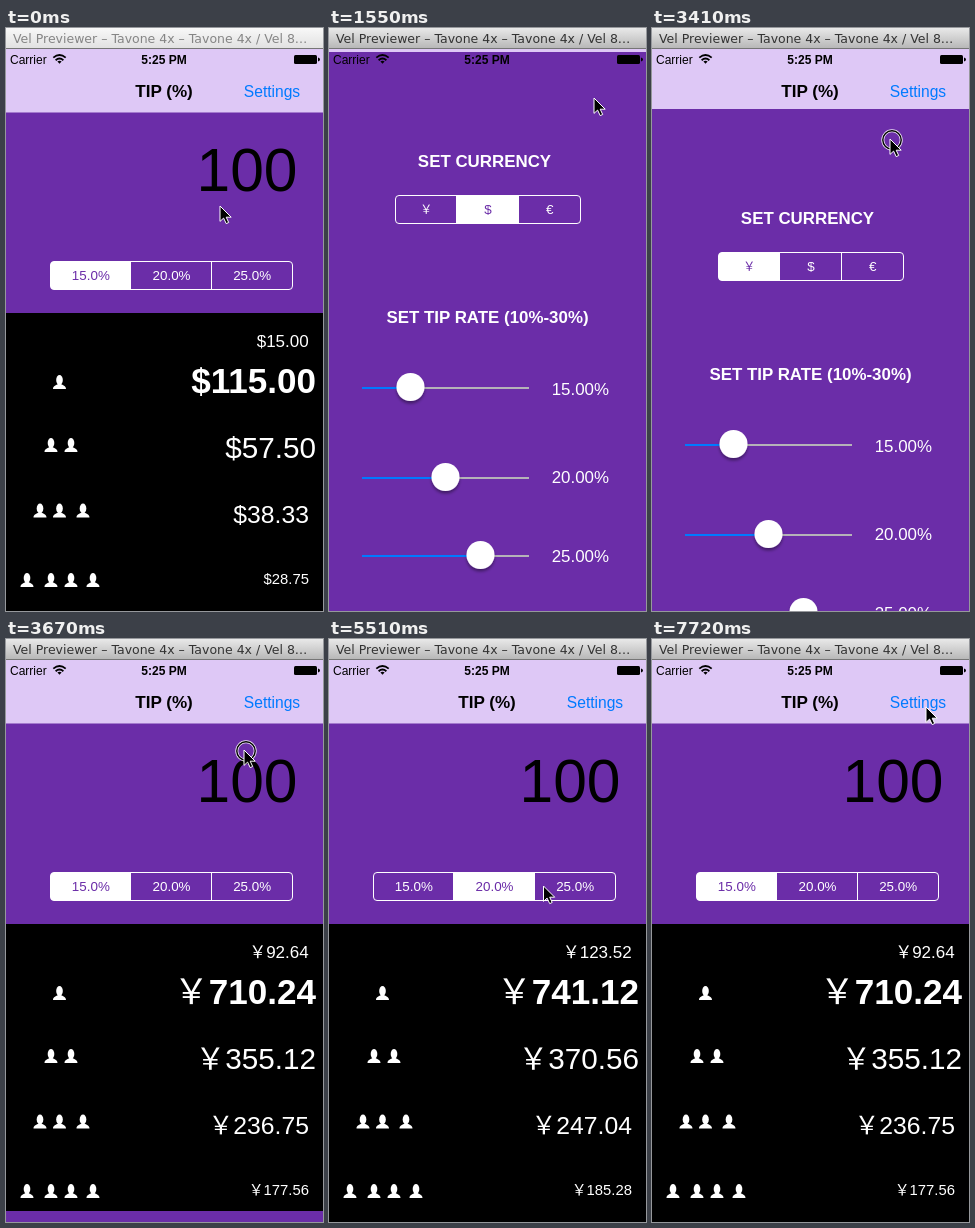
An HTML page that plays this animation: 317x583 px, repeating every 7990 ms.

```html
<!DOCTYPE html>
<html lang="en">
<head>
<meta charset="utf-8">
<title>Tip calculator</title>
<style>
  html, body { margin: 0; width: 100%; height: 100%; overflow: hidden; background: #000; }
  svg { display: block; width: 317px; height: 583px; }
  text { font-family: "Liberation Sans", Arial, sans-serif; font-size: 16.9px; }
  .bold { font-weight: 700; }
  .end { text-anchor: end; }
  .mid { text-anchor: middle; }
  .white { fill: #fff; }
  .small { font-size: 12px; }
  .yen { font-family: "Noto Sans CJK JP", "Noto Sans CJK SC", sans-serif; font-weight: 400; }
  .purple { fill: #6b2da8; }
  .seg text { font-size: 13.4px; text-anchor: middle; }
  .seg .yen { font-size: 12px; }
  .window { font: 12.5px "DejaVu Sans", sans-serif; }
</style>
</head>
<body>
<svg viewBox="0 0 317 583">
  <defs>
    <linearGradient id="active" x2="0" y2="1">
      <stop stop-color="#e9e9e9"/><stop offset="1" stop-color="#b5b5b5"/>
    </linearGradient>
    <linearGradient id="inactive" x2="0" y2="1">
      <stop stop-color="#f8f8f8"/><stop offset="1" stop-color="#e0e0e0"/>
    </linearGradient>
    <filter id="shadow" x="-50%" y="-50%" width="200%" height="200%">
      <feDropShadow dx="0" dy="2.5" stdDeviation="1.8" flood-opacity=".4"/>
    </filter>
    <g id="person" class="white">
      <ellipse cy="-2" rx="3.3" ry="5"/>
      <path d="M-6.5 7C-6.5 3.4-3 3.4-1.6 2H1.6C3 3.4 6.5 3.4 6.5 7Z"/>
    </g>
  </defs>

  <g id="main">
    <rect width="317" height="583"/>
    <rect class="purple" y="84" width="317" height="201"/>
    <rect y="21" width="317" height="63.5" fill="#dec8f6"/>
    <text class="bold mid" x="158" y="69" style="font-size:17.1px">TIP (%)</text>
    <text id="settings" class="mid" x="266" y="69" style="font-size:15.6px">Settings</text>
    <text class="end" x="291.5" y="163" style="font-size:60.5px">100</text>
  </g>

  <g id="page">
    <rect class="purple" y="21" width="317" height="562"/>
    <text class="bold mid white" x="155.5" y="136">SET CURRENCY</text>
    <text class="bold mid white" x="158.5" y="292">SET TIP RATE (10%-30%)</text>
  </g>

  <g id="status">
    <text class="small" x="4" y="35.5">Carrier</text>
    <g fill="none" stroke="#000" stroke-width="1.8">
      <path d="M47.3 29.6Q53.5 24.4 59.7 29.6M49.6 32.2Q53.5 28.8 57.4 32.2"/>
      <path d="M53.5 35.8L51.4 33.6Q53.5 31.8 55.6 33.6Z" fill="#000" stroke="none"/>
    </g>
    <text class="small bold mid" x="158" y="35.5">5:25 PM</text>
    <rect x="288" y="27" width="23" height="9" rx="1.5"/>
    <path d="M312 29.5q2 .4 2 2t-2 2z"/>
  </g>

  <rect id="bar" width="317" height="21"/>
  <path d="M0 20.5H317" stroke="#757575"/>
  <text id="caption" class="window" x="7" y="15">Vel Previewer – Tavone 4x – Tavone 4x / Vel 8…</text>

  <g id="cursor">
    <g id="ring" fill="none">
      <circle cx="2" cy="1" r="9.2" stroke="#fff" stroke-opacity=".9" stroke-width="3"/>
      <circle cx="2" cy="1" r="9.2" stroke="#000" stroke-width="1.4"/>
    </g>
    <path d="M0 0V15.4L3.6 12.1 6.2 17.6 8.7 16.5 6.2 11.2H11.2Z" stroke="#fff"/>
  </g>
</svg>
<script>
const LOOP = 7990, TICK = 88.05, FIRST = 500;
const PURPLE = '#6b2da8', HEIGHT = 562;
const $ = id => document.getElementById(id);

function add(parent, tag, attrs, text = '') {
  const el = document.createElementNS('http://www.w3.org/2000/svg', tag);
  for (const key in attrs) el.setAttribute(key, attrs[key]);
  el.textContent = text;
  parent.append(el);
  return el;
}

// Segmented control; returns a function that selects one cell.
function segments(parent, x, y, width, labels) {
  const g = add(parent, 'g', { class: 'seg' });
  const count = labels.length, h = 28;
  const edge = i => x + Math.floor(i * width / count);
  add(g, 'rect', { x, y, width, height: h, rx: 3.5, fill: 'none', stroke: '#fff' });
  const fill = add(g, 'path', { fill: '#fff' });
  const texts = labels.map((label, i) => {
    if (i) add(g, 'path', { d: `M${edge(i)} ${y}v${h}`, stroke: '#fff' });
    const cls = label === '￥' ? 'yen' : '';
    return add(g, 'text', { x: x + (i + .5) * width / count, y: y + 18.7, class: cls }, label);
  });
  return index => {
    const a = index === 0 ? 3.5 : 0, b = index === count - 1 ? 3.5 : 0;
    const left = edge(index), right = edge(index + 1);
    fill.setAttribute('d', `M${left + a} ${y}H${right - b}q${b} 0 ${b} ${b}V${y + h - b}` +
      `q0 ${b} ${-b} ${b}H${left + a}q${-a} 0 ${-a} ${-a}V${y + a}q0 ${-a} ${a} ${-a}Z`);
    texts.forEach((t, i) => t.setAttribute('fill', i === index ? PURPLE : '#fff'));
  };
}

const selectRate = segments($('main'), 44.5, 233.5, 242, ['15.0%', '20.0%', '25.0%']);
const selectCurrency = segments($('page'), 66.5, 164.5, 185, ['￥', '$', '€']);

// Amount rows: right edge, baseline, size, number of people (0 = tip only)
const rows = [
  [302.7, 319, 17, 0], [310, 365, 35.1, 1], [310, 430, 29.7, 2],
  [303, 495, 24.75, 3], [303, 556, 14.85, 4]
].map(([x, y, size, people]) => {
  const el = add($('main'), 'text', {
    x, y, class: 'end white' + (people === 1 ? ' bold' : ''), style: `font-size:${size}px`
  });
  const sign = add(el, 'tspan', {}), value = add(el, 'tspan', {});
  return { sign, value, people };
});

const people = [
  [354, 53.5], [417, 45, 65], [482.5, 34, 53.5, 77], [552, 21, 45, 65, 87]
];
for (const [y, ...xs] of people)
  for (const x of xs) add($('main'), 'use', { href: '#person', x, y });

// Sliders: track y, knob x, label baseline, label
const sliders = [
  [357, 81.5, 364, '15.00%'], [447, 116.5, 452, '20.00%'], [525, 151.5, 531, '25.00%']
];
for (const [y, knob, baseline, label] of sliders) {
  add($('page'), 'path', { d: `M33 ${y}H200`, stroke: '#b5b2b8', 'stroke-width': 2 });
  add($('page'), 'path', { d: `M33 ${y}H${knob}`, stroke: '#007aff', 'stroke-width': 2 });
  add($('page'), 'circle', { cx: knob, cy: y - 1, r: 14, fill: '#fff', filter: 'url(#shadow)' });
  add($('page'), 'text', { x: 280, y: baseline, class: 'end white' }, label);
}

// Pointer path: tick, x, y
const path = [
  [-1, 214, 178], [5, 265, 70], [12, 265, 70], [17, 150, 176], [22, 96, 171],
  [26, 96, 171], [29, 176, 129], [31, 176, 129], [32, 238, 111], [38, 238, 111],
  [48, 229, 229], [52, 183, 247], [55, 183, 247], [59, 246, 247], [63, 246, 247],
  [67, 116, 255], [77, 116, 255], [82, 274, 68]
];
const presses = [[8, 9], [25, 26], [32, 38], [54, 55], [62, 63], [73, 74]];

function pointer(tick) {
  if (tick <= path[0][0]) return path[0].slice(1);
  const i = path.findIndex(p => p[0] >= tick);
  if (i < 0) return path[path.length - 1].slice(1);
  const [t0, x0, y0] = path[i - 1], [t1, x1, y1] = path[i];
  const k = (tick - t0) / (t1 - t0);
  return [x0 + (x1 - x0) * k, y0 + (y1 - y0) * k];
}

// Critically damped spring: distance left, from 1 to 0
function spring(ms) {
  const x = Math.max(0, ms) * .02;
  const left = (1 + x) * Math.exp(-x);
  return left < .005 ? 0 : left;
}

function pageOffset(ms) {
  return HEIGHT * (ms < 3378 ? spring(ms - 1187) : 1 - spring(ms - 3378));
}

function showAmounts(yen, rate) {
  const bill = yen ? 617.6 : 100;
  for (const { sign, value, people } of rows) {
    const amount = people ? bill * (1 + rate) / people : bill * rate;
    sign.textContent = yen ? '￥' : '$';
    sign.setAttribute('class', yen ? 'yen' : '');
    value.textContent = (Math.round(amount * 100 + 1e-6) / 100).toFixed(2);
  }
}

function render(tick) {
  const ms = FIRST + tick * TICK;
  const yen = tick >= 26;
  const choice = tick < 55 || tick >= 74 ? 0 : tick < 63 ? 1 : 2;
  selectCurrency(yen ? 0 : 1);
  selectRate(choice);
  showAmounts(yen, [.15, .2, .25][choice]);

  $('page').setAttribute('transform', `translate(0 ${Math.round(pageOffset(ms))})`);
  $('settings').setAttribute('fill', tick === 8 || tick === 9 ? '#a6b0f8' : '#007aff');
  $('cursor').setAttribute('transform', `translate(${pointer(tick)})`);
  const pressed = presses.some(([from, to]) => tick >= from && tick <= to);
  $('ring').style.display = pressed ? '' : 'none';

  const focused = tick >= 8;
  $('bar').setAttribute('fill', `url(#${focused ? 'active' : 'inactive'})`);
  $('caption').setAttribute('fill', focused ? '#333' : '#858585');
}

// The picture is held for one tick at a time.
const start = performance.now();
let shown = null;
function frame(now) {
  const t = Math.max(0, now - start) % LOOP;
  const tick = Math.floor((t - FIRST + 15) / TICK);
  if (tick !== shown) render(shown = tick);
  requestAnimationFrame(frame);
}
frame(start);
</script>
</body>
</html>
```
